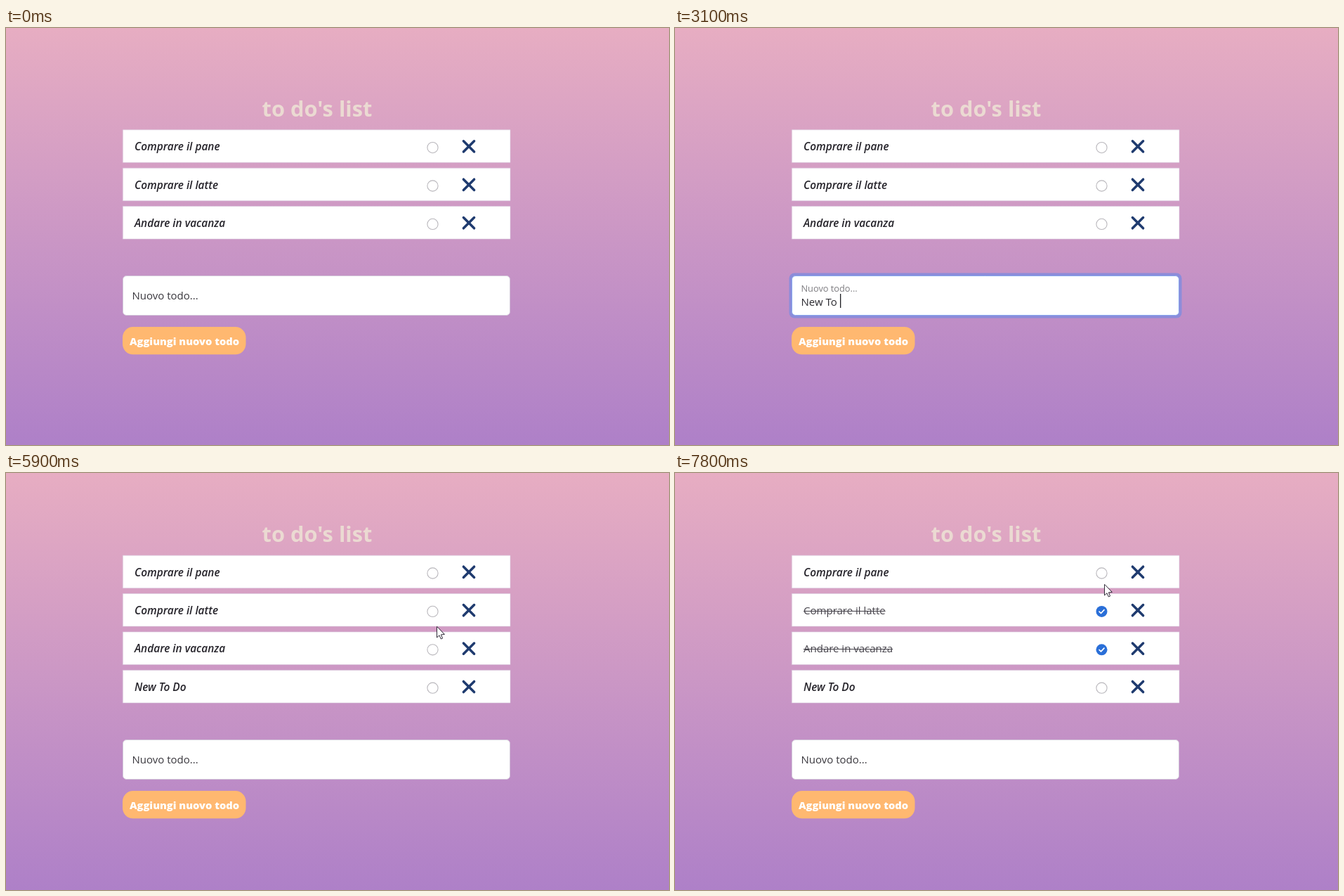
Animation of 944 by 593 pixels, one loop 8000 ms. Source, as an HTML page with a canvas:

```html
<!DOCTYPE html>
<html lang="it">
<head>
<meta charset="utf-8">
<title>to do's list</title>
<style>
  html, body { margin: 0; width: 100%; height: 100%; overflow: hidden; background: #ca96c5; }
  canvas { display: block; width: 944px; height: 593px; }
</style>
</head>
<body>
<canvas id="stage" width="944" height="593"></canvas>
<script>
const ctx = document.getElementById('stage').getContext('2d');
const W = 944, H = 593, LOOP = 8000, STEP = 100;
const FAMILY = '"Open Sans", "Noto Sans", sans-serif';
const LEFT = 166, WIDTH = 552, ROW_PITCH = 54.4, ROW_H = 46.5;

const FOCUS_AT = 50, ADD_AT = 4700;
const ENTRY = 'New To Do';
const KEY_TIMES = [800, 900, 1100, 1900, 2500, 2800, 3100, 3400, 3700];
const ITEMS = [
  { text: 'Comprare il pane' },
  { text: 'Comprare il latte', doneAt: 7200 },
  { text: 'Andare in vacanza', doneAt: 6400 },
  { text: ENTRY }
];
// time, x, y of the pointer tip
const POINTER = [
  [4800, 318, 492], [5100, 431, 569], [5400, 545, 430], [5500, 545, 430],
  [5900, 613, 218], [6100, 606, 247], [6500, 606, 247], [6700, 603, 227],
  [7000, 605, 195], [7300, 606, 194], [7800, 611, 158], [8000, 611, 158]
];

const clamp = v => Math.max(0, Math.min(1, v));
const ease = v => { const p = clamp(v); return p * p * (3 - 2 * p); };
const mix = (a, b, p) => a + (b - a) * p;

function text(str, x, y, size, color, style = '400', align = 'left') {
  ctx.font = `${style} ${size}px ${FAMILY}`;
  ctx.fillStyle = color;
  ctx.textAlign = align;
  ctx.fillText(str, x, y);
  return ctx.measureText(str).width;
}

function box(x, y, w, h, r, fill, edge) {
  ctx.beginPath();
  ctx.roundRect(x, y, w, h, r);
  ctx.fillStyle = fill;
  ctx.fill();
  if (edge) {
    ctx.strokeStyle = edge;
    ctx.lineWidth = 1;
    ctx.stroke();
  }
}

function disc(x, y, r, fill) {
  ctx.beginPath();
  ctx.arc(x, y, r, 0, Math.PI * 2);
  ctx.fillStyle = fill;
  ctx.fill();
}

function line(points, color, width) {
  ctx.beginPath();
  points.forEach(([x, y]) => ctx.lineTo(x, y));
  ctx.strokeStyle = color;
  ctx.lineWidth = width;
  ctx.stroke();
}

function drawBackground() {
  const g = ctx.createLinearGradient(0, 0, 0, H);
  g.addColorStop(0, '#e7adc2');
  g.addColorStop(1, '#ae80c8');
  ctx.fillStyle = g;
  ctx.fillRect(0, 0, W, H);
}

function drawCheck(x, y, age) {
  if (age < 0) {
    ctx.beginPath();
    ctx.arc(x, y, 7.6, 0, Math.PI * 2);
    ctx.strokeStyle = '#b9b7bc';
    ctx.lineWidth = 1.1;
    ctx.stroke();
    return;
  }
  const pressed = age < 400;
  if (pressed) disc(x, y, 11.5, '#d3cbe2');
  disc(x, y, 8, pressed ? '#5d4099' : '#2a6fd8');
  line([[x - 3.4, y + 0.2], [x - 1, y + 2.6], [x + 3.5, y - 2.2]], '#fff', 1.7);
}

function drawRow(item, y, t) {
  const age = item.doneAt === undefined ? -1 : t - item.doneAt;
  box(LEFT + 0.5, y, WIDTH - 0.5, ROW_H, 0, '#fff', 'rgba(215,200,220,0.6)');
  if (age < 0) {
    text(item.text, 183, y + 29.3, 15.45, '#26242b', 'italic 600');
  } else {
    const w = text(item.text, 183, y + 29.3, 15, '#45424a');
    ctx.fillStyle = '#45424a';
    ctx.fillRect(183, Math.round(y + 24), w, 1);
  }
  drawCheck(607.5, y + 25.3, age);
  const cx = 659, cy = y + 23.6, r = 7.6;
  line([[cx - r, cy - r], [cx + r, cy + r]], '#1f3b6f', 3.5);
  line([[cx + r, cy - r], [cx - r, cy + r]], '#1f3b6f', 3.5);
}

function drawInput(y, t) {
  const focused = t >= FOCUS_AT && t < ADD_AT;
  const ring = t < ADD_AT ? ease((t - FOCUS_AT) / 150) : 1 - ease((t - ADD_AT + 50) / 150);
  const lift = t < ADD_AT ? ease((t - FOCUS_AT) / 120) : 1 - ease((t - ADD_AT + 50) / 120);

  if (ring > 0) {
    ctx.globalAlpha = ring;
    box(LEFT - 3.5, y - 3.5, WIDTH + 7, 64, 7.5, '#8c8cda');
    ctx.globalAlpha = 1;
  }
  box(LEFT + 0.5, y + 0.5, WIDTH - 1, 56, 5, '#fff', ring > 0.5 ? '#86a8ee' : '#d3c8da');

  ctx.globalAlpha = mix(1, 0.65, lift);
  text('Nuovo todo...', 179.5, y + mix(34.3, 22.8, lift), mix(15, 12.75, lift), '#38363c');
  ctx.globalAlpha = 1;

  if (!focused) return;
  const typed = KEY_TIMES.filter(k => k <= t);
  const w = text(ENTRY.slice(0, typed.length), 179.5, y + 42.8, 15, '#2c2b31');
  const since = t - (typed.length ? typed[typed.length - 1] : 200);
  if (t >= 200 && Math.floor(since / 500) % 2 === 0) {
    ctx.fillStyle = '#1d1d22';
    ctx.fillRect(Math.round(180 + w), y + 26, 1.3, 20);
  }
}

function drawPointer(t) {
  const i = POINTER.findIndex(p => p[0] > t);
  if (i < 1) return;
  const [t0, x0, y0] = POINTER[i - 1], [t1, x1, y1] = POINTER[i];
  const p = (t - t0) / (t1 - t0);
  ctx.save();
  ctx.translate(mix(x0, x1, p), mix(y0, y1, p));
  ctx.beginPath();
  [[0.5, 0.5], [0.5, 16], [4, 12.8], [6.3, 18], [8.6, 17], [6.4, 11.9], [11, 11.5]]
    .forEach(([x, y]) => ctx.lineTo(x, y));
  ctx.closePath();
  ctx.fillStyle = '#fff';
  ctx.fill();
  ctx.strokeStyle = '#2f2b38';
  ctx.lineWidth = 1;
  ctx.stroke();
  ctx.restore();
}

function draw(t) {
  const added = t >= ADD_AT;
  const top = added ? 117.2 : 144.8;
  const inputY = added ? 379 : 352;

  ctx.lineCap = ctx.lineJoin = 'round';
  drawBackground();
  text("to do's list", 443, top - 19.3, 30.8, '#ebdad2', '700', 'center');
  ITEMS.slice(0, added ? 4 : 3).forEach((item, i) => drawRow(item, top + i * ROW_PITCH, t));
  drawInput(inputY, t);
  box(LEFT, inputY + 73, 175.5, 39.3, 15, '#ffb870');
  text('Aggiungi nuovo todo', 254, inputY + 98.7, 14.7, '#fff', '800', 'center');
  drawPointer(t);
}

function tick() {
  const t = performance.now() % LOOP;
  draw(Math.floor(t / STEP) * STEP);
  requestAnimationFrame(tick);
}
tick();
</script>
</body>
</html>
```
